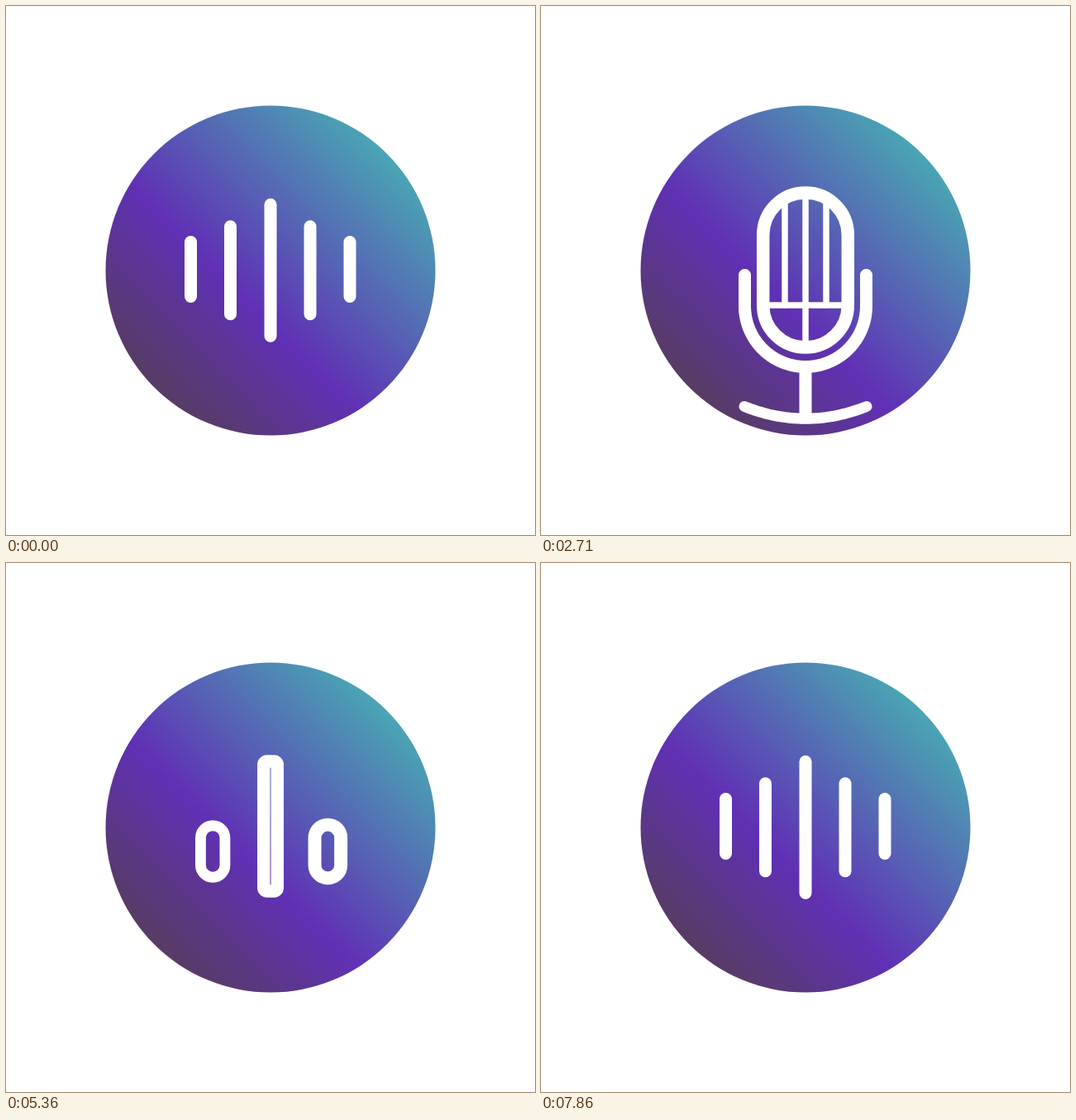
An HTML page with a canvas for the animation above (8000 ms loop, 640 by 640 pixels).

```html
<!DOCTYPE html>
<html lang="en">
<head>
<meta charset="utf-8">
<title>Audio icons</title>
<style>
  html, body { margin: 0; width: 100%; height: 100%; overflow: hidden; background: #fff; }
  canvas { display: block; width: 100vw; height: 100vh; }
</style>
</head>
<body>
<canvas id="stage"></canvas>
<script>
const LOOP = 8000, SIZE = 640, MID = 320;
const canvas = document.getElementById('stage');
const ctx = canvas.getContext('2d');
const dpr = window.devicePixelRatio || 1;
canvas.width = canvas.height = SIZE * dpr;

const disc = ctx.createLinearGradient(179, 461, 461, 179);
disc.addColorStop(0, '#573c64');
disc.addColorStop(.385, '#6030b5');
disc.addColorStop(1, '#4aa5b3');

const mix = (a, b, p) => a + (b - a) * p;
const smooth = p => p * p * (3 - 2 * p);
const swing = p => (1 - Math.cos(Math.PI * p)) / 2;
const back = p => 1 + 2.2 * (p - 1) ** 3 + 1.2 * (p - 1) ** 2;
const part = (t, a, b, ease = smooth) => ease(Math.min(1, Math.max(0, (t - a) / (b - a))));
const linear = p => p;

// Value at time t from [time, value] steps
function track(t, steps) {
  let v = steps[0][1];
  for (let i = 1; i < steps.length; i++) {
    v = mix(v, steps[i][1], part(t, steps[i - 1][0], steps[i][0]));
  }
  return v;
}

function line(x1, y1, x2, y2, w) {
  if (w <= 0) return;
  ctx.lineWidth = w;
  ctx.beginPath();
  ctx.moveTo(x1, y1);
  ctx.lineTo(x2, y2);
  ctx.stroke();
}

const bar = (x, y, half, w) => line(x, y - half, x, y + half, w);

function box(cx, cy, w, h, r, sw) {
  ctx.lineWidth = sw;
  ctx.beginPath();
  ctx.roundRect(cx - w / 2, cy - h / 2, w, h, Math.min(r, w / 2, h / 2));
  ctx.stroke();
}

// Strokes the section a..b of a parametric curve
function curve(point, a, b, w) {
  if (b - a < .001) return;
  ctx.lineWidth = w;
  ctx.beginPath();
  for (let i = 0; i <= 60; i++) ctx.lineTo(...point(mix(a, b, i / 60)));
  ctx.stroke();
}

// A straight leg followed by a quarter ellipse
const bend = (x, y0, y1, rx, ry, side, dir) => u => {
  const leg = Math.abs(y1 - y0), arc = 115, d = u * (leg + arc);
  if (d <= leg) return [x, mix(y0, y1, leg ? d / leg : 1)];
  const q = (d - leg) / arc * Math.PI / 2;
  return [x + side * rx * (1 - Math.cos(q)), y1 + dir * ry * Math.sin(q)];
};

const base = u => {
  const v = 1 - u;
  return [mix(246, 394, u), 484.5 * (v * v + u * u) + 2 * 514 * u * v];
};

const FULL = [33, 53, 79.5, 53, 33];
const BAR_X = [223.5, 271.5, 320, 368, 416];
const REST = 29.5;

function equalizer(t) {
  const beat = t < 1000 ? Math.sin(Math.PI * t / 666.67) ** 2 : 1;
  const inward = part(t, 900, 1700);
  BAR_X.forEach((x, i) => {
    const p = t >= 7800 ? 0 : beat;
    const cx = i === 1 ? mix(x, 295, inward) : i === 3 ? mix(x, 345, inward) : x;
    const cy = mix(i % 4 ? 319.7 : 318.5, 320.7, p);
    bar(t >= 7800 ? x : cx, cy, mix(FULL[i], REST, p), 15);
  });
}

function micStand(t) {
  const pull = part(t, 1880, 2150), draw = part(t, 1850, 2200);
  const gone = part(t, 2820, 3300);
  const x = track(t, [[1600, 223.5], [1830, 216], [2150, 246.5]]);
  const top = mix(291, 325.5, pull), low = mix(350, 363, pull);
  const r = MID - x, leg = low - top;
  const from = leg / (leg + 115);
  for (const side of [1, -1]) {
    const cx = MID - side * r;
    curve(bend(cx, top, low, r, 73.5, side, 1), gone, mix(from, 1, draw), 15);
  }
  const stem = part(t, 2080, 2250), lift = part(t, 2950, 3350);
  if (stem > 0 && lift < 1) {
    ctx.lineCap = 'butt';
    line(MID, mix(437, 498, lift), MID, mix(437, 498, stem), 15);
    ctx.lineCap = 'round';
  }
  const open = part(t, 2200, 2500), trim = part(t, 3480, 3943, linear);
  if (open > 0 && trim < 1) {
    curve(base, mix(.5, 0, open) + .21 * trim, mix(.5, 1, open) - .68 * trim, 13);
  }
}

function buildMic(t) {
  const grow = part(t, 1300, 1700, back), thin = part(t, 1250, 1650);
  const inward = part(t, 900, 1700), reach = part(t, 1300, 1700);
  const lw = mix(15, 7.5, thin);
  ctx.translate(0, -58 * Math.sin(Math.PI * part(t, 1820, 2320, linear)));
  if (t > 1320) box(MID, 319.5, 102.6 * grow, mix(59, 187, grow), 51, 15.5);
  const top = mix(291, 240, reach), low = mix(350, 362, reach);
  line(mix(271.5, 295, inward), top, mix(271.5, 295, inward), low, lw);
  line(mix(368, 345, inward), top, mix(368, 345, inward), low, lw);
  line(MID, mix(291, 232, reach), MID, mix(350, 408, reach), lw);
  const across = part(t, 1700, 1950);
  if (across > 0) line(MID - 46 * across, 362, MID + 46 * across, 362, 7.5);
  micStand(t);
}

function cassetteFace(m, scale) {
  const w = 7.5 * scale;
  const topY = mix(240, 271, m), lowY = mix(362, 289, m);
  const topX = mix(25, 72, m), lowX = mix(25, 56, m), wide = mix(46, 56, m);
  for (const s of [-1, 1]) line(MID + s * topX, topY, MID + s * lowX, lowY, w);
  line(MID - wide, lowY, MID + wide, lowY, w);
}

function spin(t) {
  const m = part(t, 2850, 3650);
  const hop = track(t, [[4290, 0], [4400, 22], [4570, -80], [4770, 0]]);
  ctx.translate(0, hop);
  ctx.save();
  ctx.translate(MID, MID);
  ctx.rotate(-2 * Math.PI * part(t, 2720, 3885, swing));
  ctx.translate(-MID, -MID);
  box(MID, mix(319.5, 320, m), mix(102.6, 187.5, m), mix(187, 110, m), mix(51, 3, m), 15.5);
  const shrink = part(t, 2800, 3200);
  if (shrink < 1) line(MID, mix(232, 320, shrink), MID, mix(408, 320, shrink), 7.5);
  cassetteFace(m, 1);
  micStand(t);
  ctx.restore();
  const left = part(t, 3400, 3750, back), right = part(t, 3480, 3830, back);
  if (left > 0) box(282.5, 326.5, 34 * left, 34 * left, 17, 8 * left);
  if (right > 0) box(357, 326.5, 41 * right, 41 * right, 20.5, 15 * right);
}

function cups(t) {
  const p = part(t, 5000, 5570), end = part(t, 7440, 7800);
  const cup = (x0, x1, x2, d, w, k) => box(
    mix(mix(x0, x1, p), x2, end),
    mix(mix(326.5, 358.8, p), 318.5, end),
    mix(mix(d, 27.5, p), 0, end),
    mix(mix(d, 75, p), 66, end),
    20,
    mix(mix(w, 20.5, p ** k), 15, end)
  );
  cup(282.5, 236, 223.5, 34, 8, 2.6);
  cup(357, 403.5, 416, 41, 15, 4.8);
}

function band(t) {
  const open = part(t, 5440, 5940), close = part(t, 7300, 7640);
  for (const s of [1, -1]) {
    const path = bend(MID - s * 117.2, 361.5, 319.5, 117.2, 117.25, s, -1);
    curve(path, mix(1, 0, open), 1 - close, 15.5);
  }
}

function collapsingFrame(t) {
  const fold = part(t, 5000, 5350), drop = part(t, 5390, 5680);
  if (t < 5250) cassetteFaceFold(part(t, 5000, 5250));
  box(MID, mix(mix(320, 318.5, fold), 359, drop), mix(mix(187.5, 16.5, fold), 0, drop),
    mix(mix(110, 157, fold), 36, drop), mix(3, 4, fold), mix(15.5, 8, drop));
}

function cassetteFaceFold(p) {
  ctx.save();
  ctx.translate(MID, 0);
  ctx.scale(1 - p * .95, 1);
  ctx.translate(-MID, 0);
  cassetteFace(1, 1);
  ctx.restore();
}

const SMALL = [
  // x, centre, rest half, beat, final x
  [276, 356, 20, 8, 271.5],
  [299.7, 354.7, 20, 15, 320],
  [320, 359, 18, 22, 320],
  [340, 355, 19, 15, 320],
  [364, 357, 20, 8, 368]
];

function smallBars(t) {
  const spread = part(t, 5660, 5960, back), end = part(t, 7420, 7800);
  const pulse = t > 6070 && t < 7404 ? Math.sin(Math.PI * (t - 6070) / 667) ** 2 : 0;
  SMALL.forEach(([x, y, half, beat, goal], i) => {
    const full = FULL[i === 0 || i === 4 ? 1 : 2];
    bar(mix(mix(MID, x, spread), goal, end), mix(y, 319.7, end),
      mix(half + beat * pulse, full, end), mix(8, 15, end));
  });
}

function headphones(t) {
  if (t < 5680) collapsingFrame(t);
  else smallBars(t);
  cups(t);
  band(t);
}

function draw(t) {
  ctx.setTransform(dpr, 0, 0, dpr, 0, 0);
  ctx.fillStyle = '#fff';
  ctx.fillRect(0, 0, SIZE, SIZE);
  ctx.fillStyle = disc;
  ctx.beginPath();
  ctx.arc(MID, MID, 199.5, 0, 2 * Math.PI);
  ctx.fill();
  ctx.strokeStyle = '#fff';
  ctx.lineCap = ctx.lineJoin = 'round';
  if (t < 1250 || t >= 7800) equalizer(t);
  else if (t < 2720) buildMic(t);
  else if (t < 5000) spin(t);
  else headphones(t);
}

const start = performance.now();
function tick() {
  draw((performance.now() - start) % LOOP);
  requestAnimationFrame(tick);
}
tick();
</script>
</body>
</html>
```
